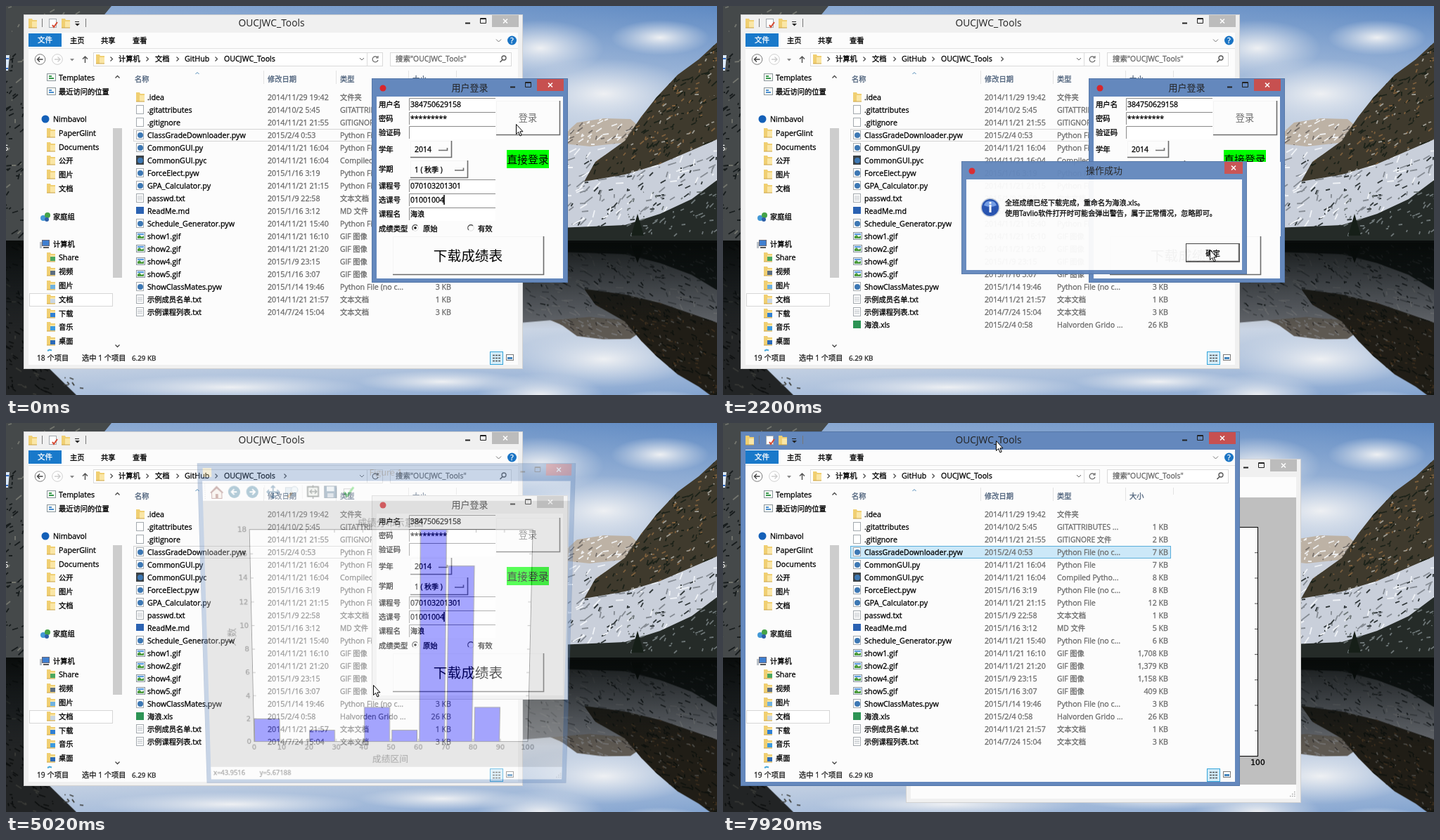
An HTML page that plays this animation: 1011 by 554 pixels, repeating every 8 s.

```html
<!DOCTYPE html>
<html lang="zh-CN">
<head>
<meta charset="utf-8">
<title>OUCJWC_Tools</title>
<style>
html, body { margin: 0; width: 100%; height: 100%; overflow: hidden; }
#stage { position: relative; width: 100%; height: 100%; overflow: clip; contain: strict; }
svg { position: absolute; left: 0; top: 0; width: 1011px; height: 554px; overflow: hidden; }
text { font-family: "Open Sans", "Noto Sans CJK SC", "Noto Sans CJK", sans-serif; white-space: pre; }
.plot text { font-family: "DejaVu Sans", "Noto Sans CJK SC", "Noto Sans CJK", sans-serif; }
.frame { fill: #f0f0f0; stroke: #d2d2d2; }
.close { fill: #bcbcbc; }
.on .frame { fill: #6488bd; stroke: #5577a8; }
.on .close { fill: #c75050; }
.muted .close { fill: #a8658f; }
.pick { fill: none; stroke: #d4d4d4; }
.on .pick { fill: #cce8f8; stroke: #5aaedb; }
.caret, .blank { visibility: hidden; }
.showCaret .caret, .redraw .blank { visibility: visible; }
.hi { stroke: #f4f4f4; } .lo { stroke: #6b6b6b; }
.press .button .hi { stroke: #6b6b6b; } .press .button .lo { stroke: #eee; }
</style>
</head>
<body>
<div id="stage"></div>
<script>
const INK = '#000', GREY = '#6a6a6a', HEAD = '#4c607a', PAPER = '#fcfcfc';
const rect = (x, y, w, h, fill = 'none', extra = '') => `<rect x="${x}" y="${y}" width="${w}" height="${h}" fill="${fill}" ${extra}/>`;
const path = (d, stroke = '#444', width = 1, extra = '') => `<path d="${d}" fill="none" stroke="${stroke}" stroke-width="${width}" ${extra}/>`;
const shape = (d, fill, extra = '') => `<path d="${d}" fill="${fill}" ${extra}/>`;
const disc = (x, y, r, fill, extra = '') => `<circle cx="${x}" cy="${y}" r="${r}" fill="${fill}" ${extra}/>`;
// A hairline outline gives small text the weight of hinted screen type
const text = (x, y, s, size = 10.7, fill = INK, extra = '') =>
  `<text x="${x}" y="${y}" font-size="${/[\u4e00-\u9fff]/.test(s) ? size * .96 : size}" fill="${fill}" stroke="${fill}" stroke-width="${size < 12 ? .3 : 0}" ${extra}>${s}</text>`;
const MID = 'text-anchor="middle"', END = 'text-anchor="end"';
const $ = id => document.getElementById(id);

function layer(name, content, origin = '0 0') {
  $('stage').insertAdjacentHTML('beforeend', `<svg id="${name}" viewBox="0 0 1011 554" style="transform-origin:${origin}">${content}</svg>`);
  return $(name);
}

const folder = (x, y) => shape(`M${x} ${y}h5l1 2h6v11h-12z`, '#f0cf72') + shape(`M${x + 5} ${y + 4}h7v9h-7z`, '#fae6a6') + path(`M${x} ${y + 13}h12`, '#c9a143');
const sheet = (x, y, inner = '') => rect(x + .5, y + .5, 10, 12, '#fff', 'stroke="#a3a9ae"') + inner;
const icons = {
  folder,
  plain: (x, y) => sheet(x, y),
  txt: (x, y) => sheet(x, y, path(`M${x + 2} ${y + 4}h7m-7 2.5h7m-7 2.5h7`, '#b4bac0')),
  py: (x, y) => sheet(x, y, disc(x + 6, y + 7, 4, '#3d78b4')),
  pyc: (x, y) => rect(x, y, 11, 13, '#3d4347') + disc(x + 6, y + 7, 4, '#3d78b4'),
  md: (x, y) => rect(x, y + 1, 11, 10, '#2b62b2'),
  xls: (x, y) => rect(x, y + 1, 11, 11, '#2d9455'),
  gif: (x, y) => rect(x + .5, y + 1.5, 12, 10, '#e8f0f8', 'stroke="#8d969e"') + shape(`M${x + 2} ${y + 10}v-3l3-2 3 3 3-2v4z`, '#4c9b3a') + rect(x + 2, y + 3, 9, 2, '#5b9be0'),
};

function chrome(x, y, w, h, title, { size = 13.5, full = true, cx = x + w / 2 } = {}) {
  const cw = full ? 38 : 26, close = x + w - 6 - cw, k = close + cw / 2, ky = y + 9.5;
  return rect(x + .5, y + .5, w - 1, h - 1, 'none', 'class="frame"') +
    rect(x + 7, y + 26, w - 14, h - 32, PAPER) +
    text(cx, y + 18, title, size, '#222', MID) +
    rect(close, y + 1, cw, 17, 'none', 'class="close"') +
    path(`M${k - 3} ${ky - 3}l6 6m0 -6l-6 6`, '#fff', 1.5) +
    (full ? path(`M${close - 38} ${y + 12.5}h7`, '#222', 2) + path(`M${close - 16.5} ${y + 5.5}h8v7h-8zm0 1h8`, '#222') : '');
}
const bevel = (x, y, w, h, cls = '') => `<g class="${cls}">` + rect(x, y, w, h, PAPER) +
  path(`M${x + .5} ${y + h}V${y + .5}H${x + w}`, 'none', 1, 'class="hi"') +
  path(`M${x} ${y + h - .5}H${x + w - .5}V${y}`, 'none', 1.6, 'class="lo"') + '</g>';

// Desktop: lake and mountains, mirrored at the shoreline
let seed = 7;
const rnd = () => (seed = seed * 16807 % 2147483647) / 2147483647;
const flecks = (n, x, y, w, h, color, len) => {
  let d = '';
  while (n--) d += `M${(x + rnd() * w).toFixed()} ${(y + rnd() * h).toFixed()}l${(-len * rnd()).toFixed(1)} ${(len * rnd() * .8).toFixed(1)}`;
  return path(d, color, 1.8);
};
const clipped = (id, content) => `<g clip-path="url(#${id})">${content}</g>`;
const cloud = (x, y, rx, ry) => `<ellipse cx="${x}" cy="${y}" rx="${rx}" ry="${ry}" fill="url(#puff)"/>`;
const mirror = (id, extra = '') => `<use href="#${id}" transform="matrix(1 0 0 -.8 0 603)" ${extra}/>`;
layer('desktop', `<defs>
  <linearGradient id="air" x1="1" x2=".75" y2="1"><stop stop-color="#5f8ac3"/><stop offset=".3" stop-color="#9db6d8"/><stop offset=".65" stop-color="#d9dfe8"/></linearGradient>
  <radialGradient id="puff"><stop stop-color="#eef0f3"/><stop offset="1" stop-color="#dde3ec" stop-opacity="0"/></radialGradient>
  <linearGradient id="shade" x2="0" y2="1"><stop stop-color="#050807" stop-opacity=".85"/><stop offset="1" stop-color="#0c1418" stop-opacity="0"/></linearGradient>
  <clipPath id="hill"><path d="M1011 52L985 76 955 98 925 130 903 158 880 192 838 222 822 250 880 240 930 225 1011 190z"/></clipPath>
  <clipPath id="slope"><path d="M735 190L830 200 1011 180V335H735z"/></clipPath>
  <clipPath id="ridge"><path d="M735 215L790 186 812 166 850 160 888 161 910 180V250H735z"/></clipPath></defs>
  <g id="sky">` + rect(0, 0, 1011, 336, 'url(#air)') + cloud(850, 125, 130, 50) + cloud(760, 60, 90, 40) + cloud(930, 45, 70, 25) + cloud(320, 75, 190, 22) + cloud(620, 85, 120, 20) + '</g><g id="land">' +
  shape('M0 0H150L100 61 60 110 300 200 735 240V335H0z', '#45494a') + flecks(90, 0, 0, 110, 330, '#74766f', 8) + flecks(110, 0, 60, 70, 270, '#171c1d', 10) +
  clipped('ridge', rect(735, 150, 200, 110, '#bdb2a5') + flecks(140, 735, 160, 190, 80, '#efefef', 9) + flecks(110, 735, 160, 190, 80, '#77706a', 8)) +
  clipped('slope', rect(735, 180, 276, 160, '#c9cfda') + flecks(150, 740, 200, 290, 135, '#858b93', 12) + flecks(90, 740, 215, 290, 105, '#31383a', 9) + flecks(80, 740, 200, 290, 110, '#f0f3f7', 14) +
    shape('M1011 248L975 275 930 296 880 312 735 318V336H1011z', '#252b28') + flecks(60, 880, 265, 140, 60, '#6d7677', 7)) +
  clipped('hill', rect(820, 50, 191, 215, '#3f3a2d') + flecks(260, 825, 55, 195, 200, '#1c2219', 9) + flecks(130, 840, 60, 180, 170, '#7d5f3c', 6) + flecks(80, 880, 60, 150, 190, '#9d9b92', 6)) +
  shape('M898 296l9 31h-18z', '#161f18') + '</g>' +
  mirror('sky') + mirror('land', 'style="filter:brightness(.5)"') + rect(0, 335, 1011, 125, 'url(#shade)') + path('M0 335.5H1011', '#0a0d0c', 3) +
  shape('M0 70h5l-2 22h-3z', '#dce9f7') + path('M0 75h4m-4 14h3', '#2e69c4', 2) + text(-3, 206, '5', 11, '#fff'));

// Explorer
const crumb = x => path(`M${x - 1.5} 72.5l3 3-3 3`, '#444', 1.2);
const files = `.idea|2014/11/29 19:42|文件夹||folder
.gitattributes|2014/10/2 5:45|GITATTRIBUTES ...|1|plain
.gitignore|2014/11/21 21:55|GITIGNORE 文件|2|plain
ClassGradeDownloader.pyw|2015/2/4 0:53|Python File (no c...|7|py
CommonGUI.py|2014/11/21 16:04|Python File|7|py
CommonGUI.pyc|2014/11/21 16:04|Compiled Pytho...|8|pyc
ForceElect.pyw|2015/1/16 3:19|Python File (no c...|8|py
GPA_Calculator.py|2014/11/21 21:15|Python File|12|py
passwd.txt|2015/1/9 22:58|文本文档|1|txt
ReadMe.md|2015/1/16 3:12|MD 文件|5|md
Schedule_Generator.pyw|2014/11/21 15:40|Python File (no c...|6|py
show1.gif|2014/11/21 16:10|GIF 图像|1,708|gif
show2.gif|2014/11/21 21:20|GIF 图像|1,379|gif
show4.gif|2015/1/9 23:15|GIF 图像|1,158|gif
show5.gif|2015/1/16 3:07|GIF 图像|409|gif
ShowClassMates.pyw|2015/1/14 19:46|Python File (no c...|3|py
海浪.xls|2015/2/4 0:58|Halvorden Grido ...|26|xls
示例成员名单.txt|2014/11/21 21:57|文本文档|1|txt
示例课程列表.txt|2014/7/24 15:04|文本文档|3|txt`.split('\n').map((line, i) => {
  const [name, date, type, kb, icon] = line.split('|'), y = 134 + 18 * i;
  return `<g id="row${i}">` + icons[icon](185, y - 11) + text(201, y, name) + text(372, y, date, 10.7, GREY) +
    text(475, y, type, 10.7, GREY) + (kb && text(633, y, kb + ' KB', 10.7, GREY, END)) + '</g>';
}).join('');
const sidebar = [['Templates', 102], ['最近访问的位置', 122], ['Nimbavol', 161, 'cloud'], ['PaperGlint', 181], ['Documents', 201], ['公开', 220], ['图片', 240], ['文档', 260],
  ['家庭组', 300, 'home'], ['计算机', 339, 'pc'], ['Share', 358], ['视频', 378], ['图片', 398], ['文档', 418], ['下载', 438], ['音乐', 457], ['桌面', 477]]
  .map(([name, y, root], i) => {
    const x = 58;
    const icon = root === 'cloud' ? disc(56, y, 5.5, '#1460b8') :
      root === 'home' ? disc(53, y + 2, 4, '#4398d6') + disc(59, y - 2, 4, '#45a348') + disc(58, y + 4, 3, '#2d5fa8') :
      root === 'pc' ? rect(51.5, y - 5.5, 10, 8, '#3f7fd0', 'stroke="#667"') + path(`M53 ${y + 5}h8`, '#555', 2) + rect(48, y - 3, 3, 9, '#b9c0c7') :
      i < 2 ? rect(x + .5, y - 5.5, 12, 10, '#f7faf7', 'stroke="#8a9499"') + path(`M${x + 3} ${y - 2}h4m-4 3h7`, i ? '#4c8fd0' : '#3a9a4e', 2) :
      folder(x, y - 7) + (y > 350 ? rect(x + 5, y - 1, 7, 6, ['#4aa860', '#5b6d80', '#6fb2e0', '#c9d6e2', '#2f7fd3', '#3b9ae0', '#2c6ab8'][i - 10]) : '');
    return icon + text(root ? 67 : 75, y + 4, name);
  }).join('');
const explorer = layer('explorer', chrome(25, 12, 710, 505, '') + text(377.5, 29, 'OUCJWC_Tools', 13.8, '#222', MID) +
  folder(32, 18) + path('M51.5 18v12M113.5 18v12', '#777') + sheet(61, 18, path('M66 27l2 3 5-7', '#d64a32', 2)) + folder(79, 18) +
  path('M98 22.5h6', '#222') + shape('M98 25h7l-3.5 3.5z', '#222') +
  rect(32, 39, 47, 19, '#1979ca') + text(45, 52, '文件', 10.9, '#fff') + text(91, 53, '主页') + text(135, 53, '共享') + text(180, 53, '查看') +
  path('M32 60.5H728', '#e2e2e2') + path('M697 47.5l3.5 3.5 3.5-3.5', '#777') + disc(719.5, 49, 6.5, '#1a74c4') + text(719.5, 53, '?', 10.5, '#fff', MID) +
  disc(48.5, 76, 7.3, '#fff', 'stroke="#777"') + path('M52.5 76h-8m3.5-3.5l-3.5 3.5 3.5 3.5', '#444', 1.4) +
  disc(73, 76, 7.3, '#fff', 'stroke="#d0d0d0"') + path('M69 76h8m-3.5-3.5l3.5 3.5-3.5 3.5', '#ccc', 1.4) + shape('M91 75h6l-3 3.5z', '#888') +
  path('M112.5 81v-9m-3.5 3.5l3.5-3.5 3.5 3.5', '#555', 1.5) +
  rect(124.5, 66.5, 411, 19, '#fff', 'stroke="#dadada"') + path('M513.5 67v18', '#dadada') + folder(128, 69) + [150, 201, 244, 299].map(crumb).join('') +
  `<g id="tail">${crumb(397)}</g>` + text(160, 79, '计算机') + text(212, 79, '文档') + text(254, 79, 'GitHub') + text(310, 79, 'OUCJWC_Tools') +
  path('M503 74l3 3 3-3', '#666') + path('M528 73a4 4 0 1 0 1 4m0-6v3h-3', '#666', 1.2) +
  rect(546.5, 66.5, 172, 19, '#fff', 'stroke="#dadada"') + text(554, 79, '搜索"OUCJWC_Tools"', 10.9, '#666') + disc(708, 74, 3, 'none', 'stroke="#555" stroke-width="1.3"') + path('M706 76.5l-3.5 3.5', '#555', 1.6) +
  rect(33.5, 409.5, 118, 18, '#fff', 'stroke="#d6d6d6"') + sidebar + path('M59 491l3-1.5 3 1', '#48a9dc', 2) +
  rect(152, 174, 13, 213, '#cdcdcd') + path('M155.5 102.5l3-3 3 3M155.5 482.5l3 3 3-3', '#444', 1.3) +
  path('M366.5 92v19M469.5 92v19M572.5 92v19M640.5 92v10', '#e3e3e3') + path('M269.5 97l2.5-2.5 2.5 2.5', '#4a87b5') +
  text(183, 108, '名称', 10.7, HEAD) + text(372, 108, '修改日期', 10.7, HEAD) + text(475, 108, '类型', 10.7, HEAD) + text(578, 108, '大小', 10.7, HEAD) +
  rect(181.5, 175.5, 455, 17, 'none', 'class="pick"') + files +
  '<g id="count">' + text(44, 505, '18 个项目', 10.7, '#222') + '</g>' + text(108, 505, '选中 1 个项目', 10.7, '#222') + text(179, 505, '6.29 KB', 9.8, '#222') +
  rect(688.5, 492.5, 18, 18, '#d3edfa', 'stroke="#35a5da"') + path('M692 497.5h3m1 0h3m1 0h3m-11 4h3m1 0h3m1 0h3m-11 4h3m1 0h3m1 0h3', '#555', 1.4) +
  rect(711.5, 496.5, 10, 8, '#fff', 'stroke="#777"') + rect(713, 500, 7, 3, '#4384bb'));

// Login form
const tkDot = (x, y) => disc(x, y, 4.5, '#d8262c');
const entry = (y, s = '', extra = '') => rect(573, y, 123, 19, '#fff') + path(`M573.5 ${y + 18}V${y + .5}H696`, '#8b8b8b') + text(575, y + 13, s, 10.5) + extra;
const menu = (y, w, h, s) => bevel(575, y, w, h) + text(581, y + h / 2 + 4, s, 10.5) + bevel(575 + w - 19, y + h / 2 - 2, 13, 4);
const radio = (x, on) => disc(x, 316, 4, '#fff') + path(`M${x - 3} 319a4 4 0 0 1 6-6`, '#555', 1.3) + path(`M${x + 3} 313a4 4 0 0 1-6 6`, '#ddd') + (on ? disc(x, 316, 1.8, '#000') : '');
const login = layer('login', chrome(520, 103, 279, 291, '用户登录') + tkDot(536, 117) +
  [['用户名', 144], ['密码', 164], ['验证码', 184], ['学年', 208], ['学期', 236], ['课程号', 260], ['选课号', 280], ['课程名', 300], ['成绩类型', 321]]
    .map(([s, y]) => text(530, y, s, 10.8)).join('') +
  entry(131, '384750629158') + entry(151, '*********') + entry(171) + menu(192, 59, 24, '2014') + menu(220, 82, 25, '1 ( 秋季 )') +
  entry(247, '070103201301') + entry(267, '01001004', path('M623 269v14', '#000', 1.6, 'class="caret"')) + entry(287, '海浪') +
  radio(582, true) + text(593, 321, '原始', 10.8) + radio(661) + text(671, 321, '有效', 10.8) +
  bevel(697, 135, 91, 49) + text(742, 164, '登录', 13.7, '#6d6d6d', MID) +
  rect(712, 205, 60, 26, '#0f0') + text(742, 224, '直接登录', 15.5, INK, MID) +
  bevel(550, 328, 215, 55, 'button') + text(657, 363, '下载成绩表', 20.5, INK, MID) +
  '<g class="blank">' + rect(527, 222, 266, 106, PAPER) + '</g>');

// Message boxes
const badge = (x, y, mark) => disc(x, y, 13.5, '#c3cbd8') + disc(x, y, 12, '#2350b0') + shape(`M${x - 9} ${y - 3}a9.5 9.5 0 0 1 18 0q-9 4-18 0z`, '#6f9ae4') +
  text(x, y + 7, mark, 20, '#fff', MID + ' font-weight="700"');
const button = (x, y, s, main) => (main ? rect(x - .5, y - .5, 76, 26, 'none', 'stroke="#444"') : '') + bevel(x, y, 75, 25, main ? 'button' : '') + text(x + 37.5, y + 17, s, 10.8, INK, MID);
const done = layer('done', chrome(339, 221, 406, 161, '操作成功', { full: false }) + tkDot(354, 235) + badge(380, 287, 'i') +
  text(401, 284, '全班成绩已经下载完成，重命名为海浪.xls。', 10.6) + text(401, 299, '使用Tavlio软件打开时可能会弹出警告，属于正常情况，忽略即可。', 10.6) +
  button(659, 339, '确定', true), '542px 301px');
const stats = layer('stats', chrome(435, 197, 215, 205, '统计信息', { full: false }) + tkDot(451, 210) + badge(477, 264, '?') +
  ['选课：43人', '通过：36人', '未通过：7人', '其中旷考/缓考：2人', '是否显示详细分布图？'].map((s, i) => text(498, 261 + 14.5 * i, s)).join('') +
  button(478, 359, '是(Y)', true) + button(560.5, 359, '否(N)'), '542px 300px');

// Chart window
const px = v => 335.5 + 4.25 * v, py = v => 474.5 - 326 / 18 * v;
let plot = rect(335.5, 148.5, 425, 326, PAPER);
[2, 0, 1, 0, 3, 1, 18, 15, 3].forEach((n, i) => { if (n) plot += rect(336.5 + 42.6 * i, py(n), 39, 474.5 - py(n), '#00f', 'stroke="#000"'); });
plot += rect(335.5, 148.5, 425, 326, 'none', 'stroke="#000"');
for (let v = 0; v <= 100; v += 10) plot += path(`M${px(v)} 474v-4M${px(v)} 149v4`, '#000', .7) + text(px(v), 487, v, 10.7, '#000', MID);
for (let v = 0; v <= 18; v += 2) plot += path(`M336 ${py(v)}h4M760 ${py(v)}h-4`, '#000', .7) + text(331, py(v) + 3.5, v, 10.7, '#000', END);
const arrowDisc = (x, s) => disc(x, 93, 9, '#2c7295') + path(`M${x + 4 * s} 93h${-8 * s}m${4 * s}-4l${-4 * s} 4 ${4 * s} 4`, '#fff', 2);
const figure = layer('figure', chrome(260, 51, 562, 490, 'Figure 1', { size: 13.2, cx: 540 }) +
  rect(268, 58, 13, 13, '#e3cf8f') + path('M270.5 81v23', '#aaa', 1, 'stroke-dasharray="1 2"') +
  shape('M278 94l10-10 10 10-2 1v8h-16v-8z', '#75302b') + shape('M281 94l7-6 7 6v8h-14z', '#f4e8dd') + rect(286, 96, 4, 7, '#843a2d') +
  arrowDisc(314, 1) + arrowDisc(341, -1) + path('M359.5 83v20M415.5 83v20', '#ddd') +
  path('M363 93h18M372 84v18M366 90l-3 3 3 3M378 90l3 3-3 3M369 87l3-3 3 3M369 99l3 3 3-3', '#245a85', 1.8) +
  rect(390.5, 86.5, 15, 12, '#c7dce9', 'stroke="#98aebb"') + disc(404, 90, 5, '#e5f0f6', 'stroke="#8aa5b8"') + path('M400 94l-6 7', '#d49a50', 3) +
  rect(423.5, 85.5, 16, 14, '#e2e7df', 'stroke="#27332e" stroke-width="2"') + path('M427 92.5h10m-3-3l3 3-3 3m-4-6l-3 3 3 3M431.5 83v4m0 12v4', '#27332e', 1.5) +
  rect(448.5, 84.5, 18, 17, '#345d80', 'stroke="#223f59"') + rect(452, 85, 11, 7, '#dae4eb') + rect(453, 95, 9, 6, '#aebccb') +
  rect(477.5, 88.5, 11, 11, '#fff', 'stroke="#888"') + path('M478 93l4 6 10-13', '#18c31b', 3) +
  rect(267, 106, 548, 409, '#bfbfbf') + `<g class="plot">${plot}` + text(547, 143.5, '成绩分布示意图', 14.7, '#000', MID) + text(547, 507, '成绩区间', 14.7, '#000', MID) +
  text(0, 0, '人数', 14.7, '#000', MID + ' transform="translate(310 311) rotate(-90)"') + '</g>' +
  '<g id="coords"></g>' + path('M806 531.5h8M809 528.5h5M812 525.5h2', '#aaa', 1.5, 'stroke-dasharray="1.5 1.5"'), '541px 296px');

const cursor = layer('cursor', '<g id="arrow">' + shape('M.5 .5V14.5L3.7 11.5 6 17 8.2 16 5.9 10.8H10z', '#fff', 'stroke="#000"') + '</g>');

const coords = (x, y) => text(271, 528, 'x=' + x, 10.3) + text(343, 528, 'y=' + y, 10.3);
const opening = { a: .6, tilt: -8, s: .96 }, nearly = { a: .92, tilt: -2, s: .99 }, shown = { a: 1 }, closing = { a: .4, tilt: -5, s: .96 }, none = { a: 0 };

// Each step overrides the state before it
const steps = [
  [0, { at: [725, 168], explorer: '', login: 'on showCaret', done: none, stats: none, figure: none, doneMode: 'on', figMode: 'on', xls: 0, tail: 0, front: 0, coords: coords('43.9516', '5.67188') }],
  [120, { at: [712, 232] }], [240, { at: [690, 320] }], [360, { at: [683, 360] }],
  [510, { login: 'on press' }], [630, { login: 'on' }],
  [930, { login: '', done: opening }], [1060, { done: nearly }], [1210, { done: shown }],
  [1930, { at: [692, 347], xls: 1 }],
  [2080, { doneMode: 'on press', tail: 1 }],
  [2200, { doneMode: 'on', login: 'on redraw', done: { a: .96 } }],
  [2350, { login: 'on', done: closing, at: [684, 340] }], [2470, { done: none, at: [670, 326] }], [2590, { xls: 2, at: [661, 318] }],
  [3710, { login: '', stats: opening }], [3860, { stats: nearly }], [3980, { stats: shown, at: [603, 327] }],
  [4130, { at: [548, 360] }], [4250, { at: [522, 373] }],
  [4870, { login: 'on showCaret', stats: closing }],
  [5020, { login: 'showCaret', stats: none, figure: { a: .35, tilt: -5.3, s: .933, dy: -5 } }],
  [5140, { figure: { a: .85, tilt: -1.5, s: .985, dy: -1 } }], [5290, { figure: shown }],
  [6970, { at: [483, 298], coords: coords('40.3226', '7.34559') }],
  [7090, { at: [403, 88], coords: '' }], [7240, { at: [387, 22] }], [7390, { at: [388, 22] }],
  [7920, { at: [388, 25], explorer: 'on', figMode: '', tail: 0, front: 1 }],
];

function pose(el, { a, tilt, s = 1, dy = 0 }) {
  el.style.opacity = a;
  el.style.visibility = a ? 'visible' : 'hidden';
  el.style.transform = tilt ? `translateY(${dy}px) perspective(800px) rotateX(${tilt}deg) scale(${s})` : 'none';
}
const shift = (i, n) => $('row' + i).setAttribute('transform', `translate(0 ${18 * n})`);

function draw(s) {
  explorer.setAttribute('class', s.explorer);
  login.setAttribute('class', s.login);
  done.setAttribute('class', s.doneMode);
  stats.setAttribute('class', 'on muted');
  figure.setAttribute('class', s.figMode);
  pose(done, s.done); pose(stats, s.stats); pose(figure, s.figure);
  explorer.style.zIndex = s.front; cursor.style.zIndex = 2;
  $('arrow').setAttribute('transform', `translate(${s.at})`);
  $('row16').style.display = s.xls ? '' : 'none';
  shift(16, s.xls === 1 ? 2 : 0);
  [17, 18].forEach(i => shift(i, s.xls === 2 ? 0 : -1));
  $('count').firstChild.textContent = (s.xls ? 19 : 18) + ' 个项目';
  $('tail').style.display = s.tail ? '' : 'none';
  $('coords').innerHTML = s.coords;
}

const states = [];
steps.forEach(([, change]) => states.push({ ...states.at(-1), ...change }));
const start = performance.now();
let current = -1;
function tick() {
  const t = (performance.now() - start) % 8000;
  const i = steps.findLastIndex(([at]) => at <= t);
  if (i !== current) draw(states[current = i]);
  requestAnimationFrame(tick);
}
tick();
</script>
</body>
</html>
```
